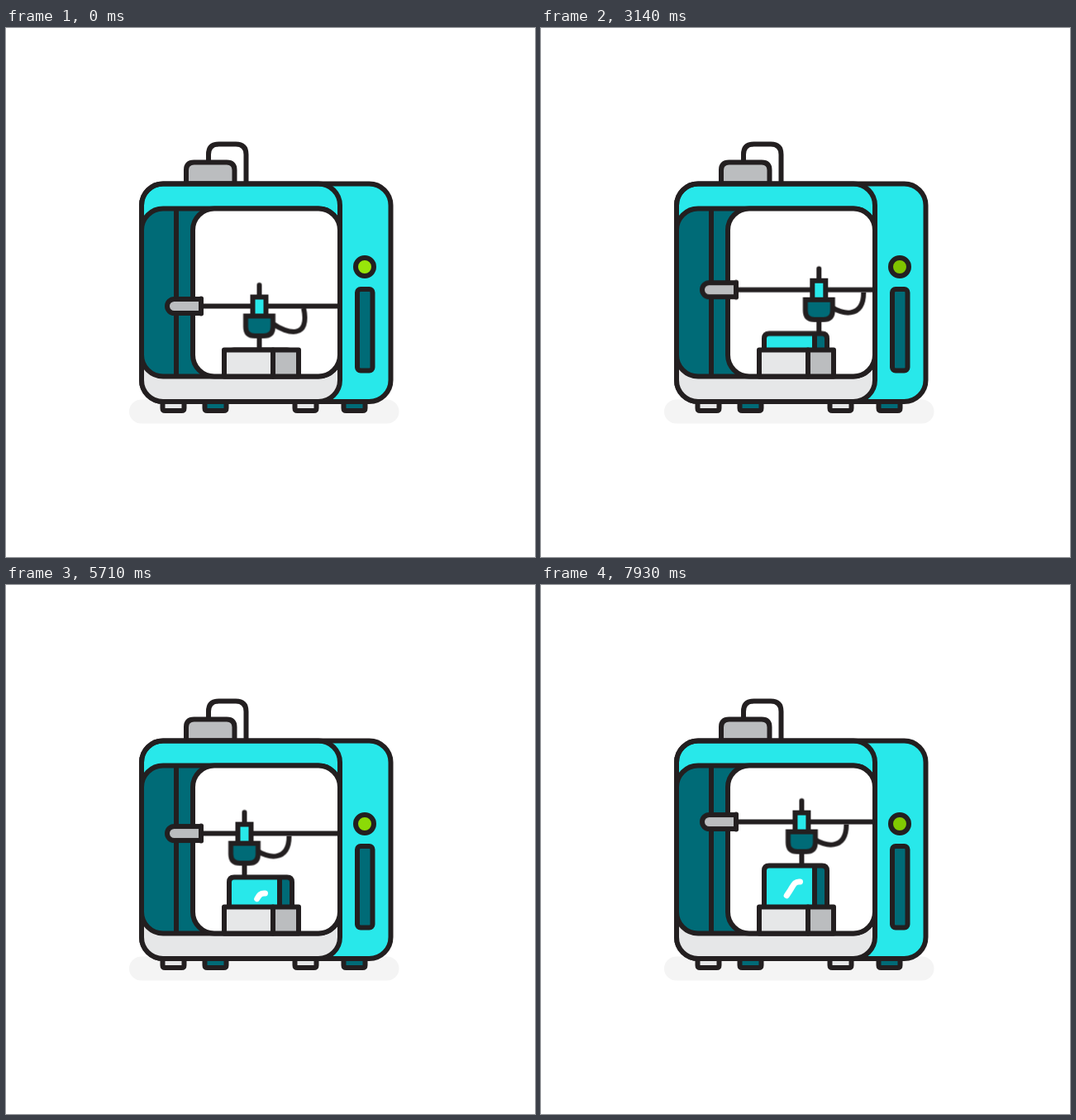
Animation, 640 px wide and 640 px high, one loop 8 s. Source, as an HTML page:

```html
<!DOCTYPE html>
<html lang="en">
<head>
<meta charset="utf-8">
<title>3D printer</title>
<style>
  html, body { margin: 0; width: 100%; height: 100%; overflow: hidden; background: #fff; }
  svg { display: block; width: 100vw; height: 100vh; }

  .ink { stroke: #231f20; stroke-width: 6; stroke-linejoin: round; }
  .none { fill: none; }
  .white { fill: #fff; }
  .cyan { fill: #28e8ea; }
  .teal { fill: #006b77; }
  .grey { fill: #bbbdbf; }
  .light { fill: #e6e7e8; }
  .round { stroke-linecap: round; }
  .square { stroke-linejoin: miter; }

  .rise, .head, .hose, .lamp, .shine { animation: 8s linear infinite; }

  .rise { animation-name: rise; }
  @keyframes rise { to { transform: translateY(-50.4px); } }

  /* Each sweep eases out of one end of the rail and into the other. */
  .head {
    --in: cubic-bezier(.47, 0, .745, .715);
    --out: cubic-bezier(.39, .575, .565, 1);
    animation-name: sweep;
  }
  @keyframes sweep {
    0% { transform: translateX(306.5px); animation-timing-function: ease-in-out; }
    11.8% { transform: translateX(280.3px); animation-timing-function: var(--in); }
    25.9% { transform: translateX(306px); animation-timing-function: var(--out); }
    42.5% { transform: translateX(337px); animation-timing-function: var(--in); }
    52.6% { transform: translateX(324px); animation-timing-function: var(--out); }
    65% { transform: translateX(280.3px); animation-timing-function: var(--in); }
    71.4% { transform: translateX(288.5px); animation-timing-function: var(--out); }
    83.9% { transform: translateX(337px); animation-timing-function: var(--in); }
    99.1% { transform: translateX(315.5px); }
    100% { transform: translateX(314px); }
  }

  .hose { animation-name: sway; }
  @keyframes sway {
    0% { d: path("M16 21C34 34 62 40 53.5 2"); }
    11.6% { d: path("M16 21C28 36 46 36 53.5 1"); }
    25.9%, 100% { d: path("M16 21C26 29 54 36 54 3"); }
  }

  .lamp { animation-name: glow; }
  @keyframes glow {
    0% { fill: #98e60a; }
    11.6% { fill: #80c800; }
    25.9%, 52.6% { fill: #80c400; }
    71.4% { fill: #8cda06; }
    83.9% { fill: #78b800; }
    100% { fill: #82ca02; }
  }

  .shine {
    fill: none; stroke: #fff; stroke-width: 7;
    stroke-dasharray: 100 300;
    animation-name: draw;
  }
  @keyframes draw {
    0%, 41.2% { stroke-dashoffset: 104; }
    52.6% { stroke-dashoffset: 80; }
    100% { stroke-dashoffset: 0; }
  }
</style>
</head>
<body>
<svg viewBox="0 0 640 640">
  <clipPath id="aboveBase"><path d="M226 218H404V400H226z"/></clipPath>

  <rect x="149" y="449.5" width="326.5" height="29" rx="14.5" fill="#f4f4f4"/>

  <g class="ink">
    <path class="light" d="M189.5 452h26v8q0 3-3 3h-20q-3 0-3-3z"/>
    <path class="teal" d="M240.5 452h26v8q0 3-3 3h-20q-3 0-3-3z"/>
    <path class="light" d="M349.5 452h26v8q0 3-3 3h-20q-3 0-3-3z"/>
    <path class="teal" d="M408.5 452h26v8q0 3-3 3h-20q-3 0-3-3z"/>

    <path class="none" d="M245 164V153q0-12.5 12.5-12.5H278q12.5 0 12.5 12.5V188"/>
    <path class="grey" d="M218 188.5V172q0-9.500 9.500-9.500H267q9.500 0 9.500 9.500V188.500z"/>
  </g>

  <!-- Housing and front panel -->
  <rect class="ink cyan" x="164" y="188.500" width="301.500" height="263.500" rx="26"/>
  <path class="light" d="M164 320H404V426a26 26 0 0 1-26 26H190a26 26 0 0 1-26-26z"/>
  <rect class="ink none" x="164" y="188.500" width="240" height="263.500" rx="26"/>
  <rect class="ink teal" x="164" y="218.500" width="240" height="203" rx="26"/>
  <path class="ink none" d="M206 218.500V421.500"/>
  <rect class="ink white" x="226" y="218.500" width="178" height="203" rx="26"/>

  <!-- Controls -->
  <circle class="ink lamp" cx="434" cy="289" r="11"/>
  <rect class="ink teal" x="425" y="316" width="18.500" height="98.500" rx="4"/>

  <!-- Printed block -->
  <g clip-path="url(#aboveBase)">
    <g class="rise">
      <path class="cyan" d="M270 450V395.500q0-6 6-6H331V450z"/>
      <path class="teal" d="M331 450V389.500H340q6 0 6 6V450z"/>
      <path class="ink none" d="M270 450V395.500q0-6 6-6H340q6 0 6 6V450M331 389.500V450"/>
      <path class="shine round" pathLength="100" d="M313.500 409C306 408 305 414.500 301 420L297 426"/>
    </g>
  </g>

  <!-- Print bed -->
  <path class="ink light" d="M264 421.500V389.500H323V421.500z"/>
  <path class="ink grey" d="M323 421.500V389.500H354V421.500z"/>

  <!-- Gantry -->
  <g class="ink rise">
    <path class="none" d="M236 336.500H404"/>
    <path class="grey" d="M236 328H203.500a8.500 8.500 0 0 0 0 17H236z"/>
    <path class="none round" d="M236 327.500V345.500"/>
    <g transform="translate(0 336.500)">
      <g class="head">
        <path class="hose none" d="M16 21C26 29 54 36 54 3"/>
        <path class="none round" d="M0-25.500V-10M0 36V50"/>
        <path class="cyan square" d="M-8-11H8V13H-8z"/>
        <path class="teal square" d="M-16.500 12H16.500V25q0 11-11 11H-5.500q-11 0-11-11z"/>
      </g>
    </g>
  </g>
</svg>
</body>
</html>
```
